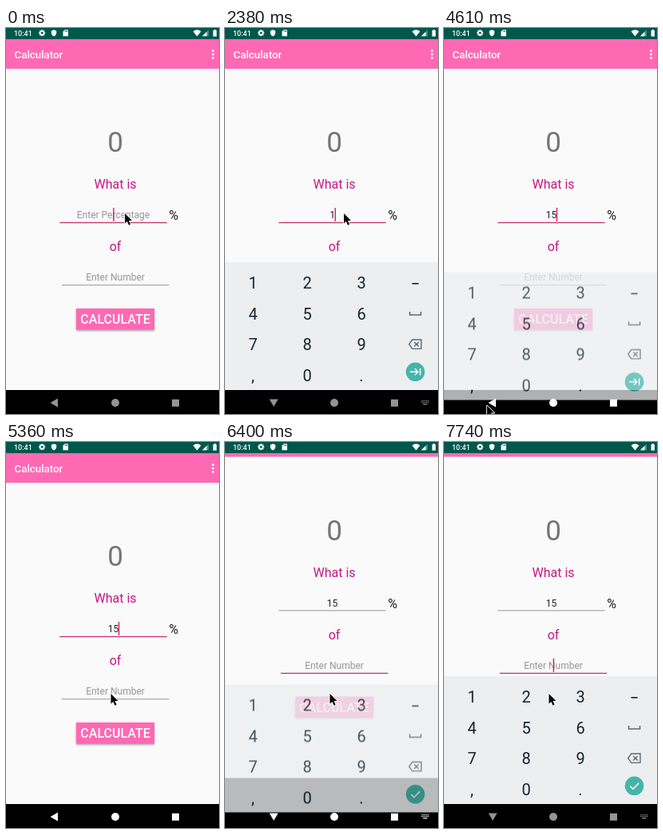
An HTML page with a canvas that plays this animation: 267x483 px, repeating every 8 s.

```html
<!DOCTYPE html>
<html lang="en">
<head>
<meta charset="utf-8">
<title>Calculator</title>
<style>
html, body { margin: 0; width: 100%; height: 100%; overflow: hidden; background: #fafafa; }
canvas { display: block; width: 267px; height: 483px; }
</style>
</head>
<body>
<canvas id="stage"></canvas>
<script>
const W = 267, H = 483, LOOP = 8000;
const STEP = 148.8;
const BLINK = 500;
const PINK = '#ff69b4', VIOLET = '#c71585', ACCENT = '#d81b60', LINE = '#c02c66';
const STATUS = '#00574b', KEY = '#14252d', KEY_ICON = '#5b686f', TEAL = '#45b5aa';

// Moments of the story, in ms
const OPEN = 150, TYPE_1 = 2300, TYPE_5 = 3150, CLOSE = 4460, NEXT = 5640, REOPEN = 6250;

const dpr = window.devicePixelRatio || 1;
let c;

function prepare(canvas) {
  canvas.width = W * dpr;
  canvas.height = H * dpr;
  const ctx = canvas.getContext('2d');
  ctx.scale(dpr, dpr);
  return ctx;
}

function rect(x, y, w, h, color) {
  c.fillStyle = color;
  c.fillRect(x, y, w, h);
}

function disc(x, y, r, color) {
  c.beginPath();
  c.arc(x, y, r, 0, Math.PI * 2);
  c.fillStyle = color;
  c.fill();
}

function fill(path, color) {
  c.fillStyle = color;
  c.fill(new Path2D(path));
}

function stroke(path, color, width) {
  c.strokeStyle = color;
  c.lineWidth = width;
  c.stroke(new Path2D(path));
}

function text(str, x, y, size, color, weight = 400, align = 'center') {
  c.font = `${weight} ${size}px Roboto, sans-serif`;
  c.textAlign = align;
  c.fillStyle = color;
  c.fillText(str, x, y);
}

// Draws with the origin moved to (x, y).
function at(x, y, draw) {
  c.save();
  c.translate(x, y);
  draw();
  c.restore();
}

const progress = (t, from, length) => Math.min(1, Math.max(0, (t - from) / length));
const mix = (a, b, p) => a + (b - a) * p;
const smooth = p => p * p * (3 - 2 * p);
const easeOut = p => 1 - (1 - p) ** 2;

function keyboardShown(t) {
  if (t < CLOSE) return easeOut(progress(t, OPEN, 278));
  if (t < NEXT) return 1 - progress(t, CLOSE, 300) ** 2;
  return easeOut(progress(t, REOPEN, 278));
}

function caretOn(t) {
  const edit = t >= NEXT ? NEXT : t >= TYPE_5 ? TYPE_5 : t >= TYPE_1 ? TYPE_1 : -90;
  return Math.floor((t - edit) / BLINK) % 2 === 0;
}

// Field to back key, then back key to the second field.
function pointerAt(t) {
  const away = smooth(progress(t, 3690, 470));
  const back = smooth(progress(t, 4610, 740));
  return [mix(mix(149, 54, away), 131.5, back), mix(mix(232, 472.5, away), 315, back)];
}

function navLight(t) {
  const lit = progress(t, CLOSE - 100, 200) - progress(t, 6900, 750);
  return mix(0.58, 1, lit);
}

function statusBar() {
  rect(0, 0, W, 14, STATUS);
  text('10:41', 10, 9.7, 9, '#fff', 500, 'left');
  at(45.2, 6.2, () => {
    for (let i = 0; i < 4; i++) {
      rect(-0.9, -4, 1.8, 8, '#fff');
      c.rotate(Math.PI / 4);
    }
    disc(0, 0, 3, '#fff');
    disc(0, 0, 1.4, STATUS);
  });
  at(60, 6.2, () => fill('M0-4L3.2-2.8V0Q3 3 0 4.2Q-3 3-3.2 0V-2.8Z', '#fff'));
  at(74.7, 6.2, () => {
    fill('M-1-4H3.2V4H-3.2V-1.8Z', '#fff');
    for (let i = 0; i < 3; i++) rect(-1 + i * 1.4, -3, 0.7, 1.8, STATUS);
  });
  at(239.5, 10.4, () => fill('M0 0L-5-6.2Q0-10 5-6.2Z', '#fff'));
  at(254, 10.2, () => {
    fill('M0 0H-8L0-8Z', 'rgba(255,255,255,.35)');
    fill('M-2.5 0H-8L-2.5-5.5Z', '#fff');
  });
  at(261.8, 2, () => {
    rect(-2.2, 0.9, 4.4, 7.7, '#fff');
    rect(-1, 0, 2, 1, '#fff');
  });
}

function field(x, y, hint, value, focused, caret) {
  const mid = x + 67.2;
  text(value || hint, mid, y - 5, 12, value ? '#212121' : '#969696');
  rect(x, y, 134.5, focused ? 1.2 : 0.9, focused ? LINE : '#8c8c8c');
  if (focused && caret) rect(mid - 0.3 + value.length * 3.3, y - 18, 1.4, 17, ACCENT);
}

function app(t) {
  const value = t < TYPE_1 ? '' : t < TYPE_5 ? '1' : '15';
  const second = t >= NEXT;
  const caret = caretOn(t);
  const pan = 32.5 * smooth(progress(t, 5950, 440));

  at(0, -pan, () => {
    rect(0, 0, W, H + pan, '#fafafa');
    rect(0, 14, W, 37, PINK);
    text('Calculator', 10.5, 38, 13.3, '#fff', 500, 'left');
    for (let i = -1; i < 2; i++) disc(259.5, 33 + i * 4.4, 1.4, '#fff');

    text('0', 137, 155, 35, '#757575');
    text('What is', 137, 201, 16, VIOLET);
    field(67.3, 243, 'Enter Percentage', value, !second, caret);
    text('%', 210, 240, 16, '#111');
    text('of', 137, 279, 16, VIOLET);
    field(69.8, 321.3, 'Enter Number', '', second, caret);

    c.shadowColor = 'rgba(0,0,0,.35)';
    c.shadowBlur = 2.5 * dpr;
    c.shadowOffsetY = dpr;
    rect(88, 351, 98, 26.5, PINK);
    c.shadowColor = 'transparent';
    text('CALCULATE', 137, 370.2, 16, '#fff', 500);
    rect(0, 453, W, H, '#000');
  });
}

function keyboardLayer(arrow) {
  const canvas = document.createElement('canvas');
  c = prepare(canvas);
  rect(0, 293, W, 160, '#eceef0');
  rect(0, 453, W, 30, '#000');
  ['123', '456', '789', ',0.'].forEach((row, r) => {
    [...row].forEach((ch, i) => text(ch, 35 + i * 68, 326 + r * 38.6, 20, KEY));
  });
  at(238.6, 319, () => rect(-4.1, 0, 8.2, 1.6, KEY));
  at(238.6, 357, () => stroke('M-7-2V2H7V-2', KEY_ICON, 1.5));
  at(238.6, 395.7, () => stroke('M-7.8 0L-3.8-5.7H7.4V5.7H-3.8ZM-1.4-2.8L4.2 2.8M4.2-2.8L-1.4 2.8', KEY_ICON, 1.4));
  at(238.6, 430.3, () => {
    disc(0, 0, 11.8, TEAL);
    stroke(arrow ? 'M-6.8 0H3.2M-.6-4L3.4 0L-.6 4M6.1-4.3V4.3' : 'M-5.3.3L-1.7 3.9L5.6-3.4', '#fff', 1.5);
  });
  return canvas;
}

function navIcons(t) {
  const typing = (t >= OPEN - 10 && t < CLOSE + 100) || t >= NEXT + 100;
  c.globalAlpha = navLight(t);
  at(61, 469, () => fill(typing ? 'M-5.3-4.4H5.6L.1 4.8Z' : 'M-5.5 0L4-5.5V5.5Z', '#fff'));
  disc(137, 469, 5, '#fff');
  rect(208, 464.7, 9, 9, '#fff');
  if (typing) {
    for (let i = 0; i < 10; i++) {
      rect(246.3 + i % 5 * 2, 466 + Math.floor(i / 5) * 2, 1.2, 1.2, '#fff');
    }
    rect(248.3, 470.2, 5.2, 1.2, '#fff');
  }
  c.globalAlpha = 1;
}

function pointer(x, y) {
  const shape = 'M0 0V12.6L2.9 9.9L5 14.7L7.1 13.7L5 9.1H9Z';
  at(x, y, () => {
    stroke(shape, '#fff', 1.7);
    fill(shape, '#000');
  });
}

const arrowKeys = keyboardLayer(true);
const checkKeys = keyboardLayer(false);
const stage = prepare(document.getElementById('stage'));
stage.lineJoin = 'round';

function draw(now) {
  const t = Math.floor((now % LOOP + 8) / STEP) * STEP;
  const shown = keyboardShown(t);
  c = stage;
  app(t);
  statusBar();
  c.globalAlpha = shown;
  c.drawImage(t < NEXT ? arrowKeys : checkKeys, 0, 48 * (1 - shown), W, H);
  navIcons(t);
  pointer(...pointerAt(t));
}

const start = performance.now();
function loop() {
  draw(performance.now() - start);
  requestAnimationFrame(loop);
}
loop();
</script>
</body>
</html>
```
